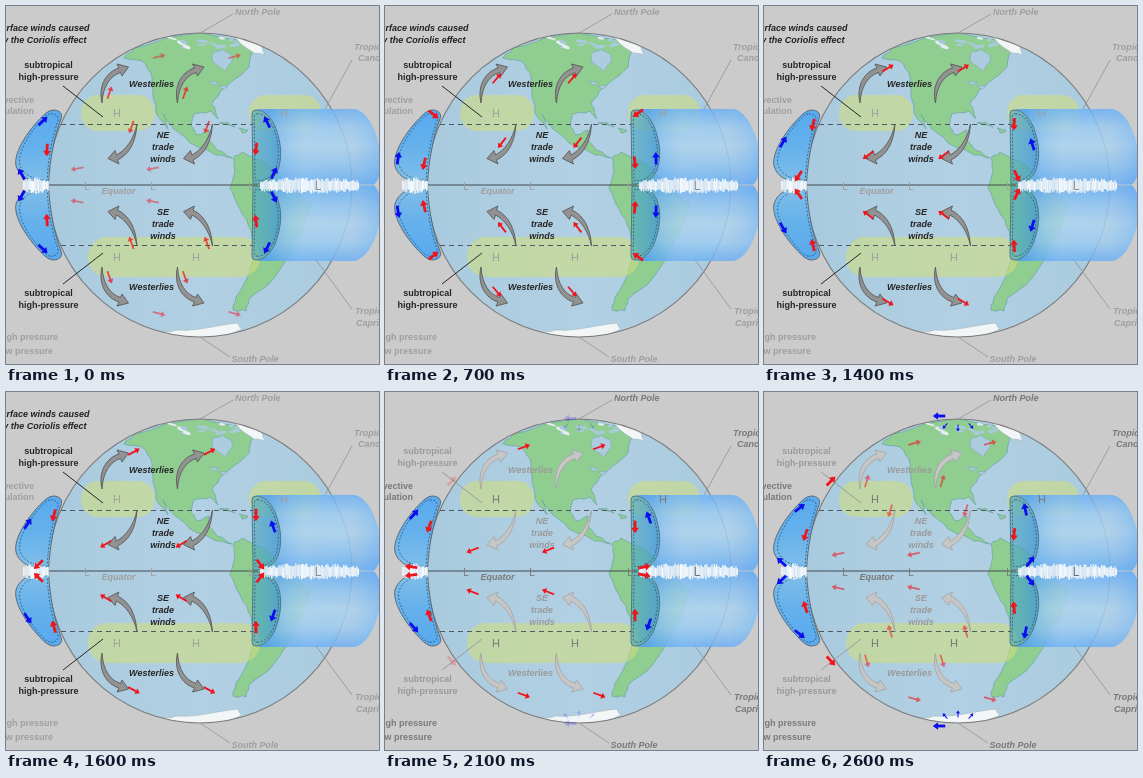
These frames come from a looping animation (373 px wide and 358 px high, 2.7 s). An HTML page with a canvas:

```html
<!DOCTYPE html>
<html lang="en">
<head>
<meta charset="utf-8">
<title>Global winds</title>
<style>
html, body { margin: 0; width: 100%; height: 100%; overflow: hidden; background: #cbcbcb; }
canvas { display: block; }
</style>
</head>
<body>
<canvas id="stage" width="373" height="358"></canvas>
<script>
const ctx = document.getElementById('stage').getContext('2d');
const W = 373, H = 358, LOOP = 2.7, SPACING = 75.5;
const RED = [240, 20, 28], BLUE = [12, 12, 240];
const clamp = v => Math.max(0, Math.min(1, v));
const ramp = (t, a, b) => clamp((t - a) / (b - a));
const mix = (a, b, k) => `rgb(${a.map((v, i) => Math.round(v + (b[i] - v) * k))})`;
const gray = (from, to, k) => mix([from, from, from], [to, to, to], k);
const red = mix(RED, BLUE, 0), blue = mix(RED, BLUE, 1);

function randomizer(seed) {
  return () => (seed = (seed * 16807) % 2147483647) / 2147483647;
}

// Surface wind tracks: one cubic Bezier each.
const westerly = [[101, 97], [106, 64], [134, 55], [163, 48]];
const trade = [[128, 111], [123, 142], [95, 162], [59, 164]];
// Convection cells: three cubic legs, each lasting one loop.
const cells = [
  [[41, 144], [40, 160], [34, 188], [15.5, 168], [5, 149], [27, 122], [37, 115], [62, 91], [43, 137]],
  [[250, 143], [248, 158], [253, 190], [268, 167], [277, 148], [263, 129], [261, 116], [246, 86], [251, 140]]
];

function bezier([a, b, c, d], u) {
  const v = 1 - u;
  const point = k => v ** 3 * a[k] + 3 * v * v * u * b[k] + 3 * v * u * u * c[k] + u ** 3 * d[k];
  const slope = k => v * v * (b[k] - a[k]) + 2 * v * u * (c[k] - b[k]) + u * u * (d[k] - c[k]);
  return { x: point(0), y: point(1), angle: Math.atan2(slope(1), slope(0)) };
}

function arrow({ x, y, angle }, color, length = 12.5, shaft = 2.8, head = 3.8) {
  const tip = length / 2, neck = tip - head * 1.4;
  ctx.save();
  ctx.translate(x, y);
  ctx.rotate(angle);
  ctx.fillStyle = color;
  ctx.fillRect(-tip, -shaft / 2, tip + neck + .5, shaft);
  ctx.beginPath();
  ctx.moveTo(neck, -head);
  ctx.lineTo(tip, 0);
  ctx.lineTo(neck, head);
  ctx.fill();
  ctx.restore();
}

function mirrored(draw) {
  draw();
  ctx.save();
  ctx.transform(1, 0, 0, -1, 0, H);
  draw();
  ctx.restore();
}

// Each surface wind appears twice per hemisphere.
function fourfold(draw) {
  mirrored(() => {
    draw();
    ctx.save();
    ctx.translate(SPACING, 0);
    draw();
    ctx.restore();
  });
}

function line(x1, y1, x2, y2, color, width = 1, dash = []) {
  ctx.strokeStyle = color;
  ctx.lineWidth = width;
  ctx.setLineDash(dash);
  ctx.beginPath();
  ctx.moveTo(x1, y1);
  ctx.lineTo(x2, y2);
  ctx.stroke();
  ctx.setLineDash([]);
}

function text(str, x, y, color, align = 'center', style = 'bold', size = 9) {
  ctx.font = `${style} ${size}px "Liberation Sans", Arial, sans-serif`;
  ctx.textAlign = align;
  ctx.fillStyle = color;
  ctx.fillText(str, x, y);
}

function shape(path, fill, stroke, width = 1) {
  ctx.fillStyle = fill;
  ctx.fill(path);
  ctx.strokeStyle = stroke;
  ctx.lineWidth = width;
  ctx.stroke(path);
}

function fade(x1, y1, x2, y2, ...stops) {
  const g = ctx.createLinearGradient(x1, y1, x2, y2);
  stops.forEach((c, i) => g.addColorStop(i / (stops.length - 1), c));
  return g;
}

// A coastline through a few points, roughened between them.
function coast(points) {
  const list = points.split(' ').map(p => p.split(',').map(Number));
  const rnd = randomizer(41), path = new Path2D();
  list.forEach(([x, y], i) => {
    const [nx, ny] = list[(i + 1) % list.length];
    path.lineTo(x, y);
    for (const k of [.33, .67])
      path.lineTo(x + (nx - x) * k + rnd() * 2 - 1, y + (ny - y) * k + rnd() * 2 - 1);
  });
  path.closePath();
  return path;
}

const globe = new Path2D();
globe.arc(194, 179, 152, 0, 7);

const lands = [
  '118,52 128,42 160,32 194,27 232,34 247,45 243,61 229,73 214,86 206,98 212,113 205,105 188,108 185,120 ' +
  '191,129 203,124 203,134 211,144 226,152 210,149 184,137 168,123 157,108 162,123 150,107 147,84 145,67 136,55',
  '227,152 236,146 260,157 282,180 305,198 294,228 281,253 262,279 243,293 240,305 227,304 230,291 ' +
  '243,268 248,250 246,230 241,214 231,198 224,182 229,165',
  '213,117 221,116 229,121', '233,122 242,124 236,127'
].map(coast);
const bays = ['207,47 216,43 225,48 226,56 219,65 207,56', '203,75 213,76 207,79', '213,80 222,79 216,83'].map(coast);
const ices = [
  '224,26 234,37 248,47 259,49 256,38',
  '154,327 170,324 200,322 232,317 236,323 210,336 170,336'
].map(coast);

const leftFace = new Path2D('M47 104C54 104 57 108 55 113C48 132 44 152 42.5 178C30 177 14 174 10 160C7 146 24 121 40 107Q44 104 47 104Z');
const rightFace = new Path2D('M250 104C258 104 264 110 269 120C276 138 276 152 272 164C268 173 260 178 252 178L247 178L246 108Q246 104 250 104Z');
const cylinder = new Path2D('M250 103L348 103C362 105 373 128 375 152C376 164 373 174 368 178.5L252 178.5C280 178 277 140 269 120C264 110 258 104 250 103Z');
const westBand = new Path2D('M96 97C92 80 100 66 113 62L111 58L122.5 61L116 70L114.5 66.5C104 70 97 80 96 97Z');
const tradeBand = new Path2D('M131 118C130 135 124 148 111.5 154L113 158L102 152.5L109 144.5L110.5 149C120 144 128 133 131 118Z');

function drawArcticWaters() {
  const rnd = randomizer(9);
  for (let i = 0; i < 16; i++) {
    ctx.fillStyle = i % 4 ? '#a9cadd' : '#e6eef0';
    ctx.beginPath();
    ctx.ellipse(166 + rnd() * 66, 30 + rnd() * 13, 2 + rnd() * 4, .7 + rnd() * 1.3, rnd() - .5, 0, 7);
    ctx.fill();
  }
}

function drawGlobe() {
  ctx.fillStyle = fade(42, 0, 346, 0, '#a9cade', '#b2d0e3', '#a9cade');
  ctx.fill(globe);
  ctx.save();
  ctx.clip(globe);
  lands.forEach(p => shape(p, '#90cd91', '#6fa9a8', .8));
  bays.forEach(p => shape(p, '#aeccdf', '#78aeb2', .6));
  drawArcticWaters();
  ices.forEach(p => shape(p, '#f3f6f7', '#9fb6c0', .6));
  ctx.restore();
  ctx.strokeStyle = '#7c7c7c';
  ctx.lineWidth = 1.1;
  ctx.stroke(globe);
  ctx.fillStyle = 'rgba(208,222,124,.58)';
  [[75, 89, 74, 36], [243, 89, 72, 36], [82, 231, 172, 40]].forEach(([x, y, w, h]) => {
    ctx.beginPath();
    ctx.roundRect(x, y, w, h, h * .48);
    ctx.fill();
  });
  mirrored(() => line(55, 118.5, 248, 118.5, '#4f5961', 1, [5, 4]));
  line(42, 179, 252, 179, '#454b50', 1.2);
}

function dashedInset(path, cx) {
  ctx.save();
  ctx.translate(cx, 142);
  ctx.scale(.84, .9);
  ctx.translate(-cx, -142);
  ctx.strokeStyle = '#24516f';
  ctx.lineWidth = .9;
  ctx.setLineDash([2, 2]);
  ctx.stroke(path);
  ctx.restore();
}

// Feathery cloud made of thin vertical streaks.
function drawCloud(x1, x2, seed) {
  const rnd = randomizer(seed);
  for (let x = x1; x < x2; x += 1.2) {
    const reach = 4 + 3 * Math.sin(Math.PI * (.1 + .85 * (x - x1) / (x2 - x1)));
    const color = mix([250, 252, 253], [198, 220, 238], rnd() * .75);
    line(x, 179.5 - reach * (.6 + .6 * rnd()), x, 179.5 + reach * (.6 + .6 * rnd()), color, 1.6);
  }
}

function drawCells() {
  mirrored(() => {
    ctx.globalAlpha = .8;
    ctx.fillStyle = fade(0, 103, 0, 179, '#5ea8f6', '#9ccbf1', '#b0d4ee', '#8cc1f0', '#5aa6f6');
    ctx.fill(cylinder);
    ctx.globalAlpha = 1;
    ctx.fillStyle = fade(262, 0, 373, 0, 'rgba(60,150,235,.4)', 'rgba(176,215,235,.2)', 'rgba(176,215,240,.1)', 'rgba(90,168,246,.4)');
    ctx.fill(cylinder);
    shape(rightFace, fade(246, 0, 275, 0, 'rgba(84,172,190,.66)', 'rgba(66,152,214,.8)'), '#4f6f80', .9);
    shape(leftFace, fade(0, 104, 0, 179, '#58a9ee', '#65b1ec', '#82bfe8'), '#59636a', .9);
    dashedInset(rightFace, 260);
    dashedInset(leftFace, 34);
  });
  drawCloud(255, 353, 77);
  drawCloud(18, 43, 19);
}

function drawLabels(dim) {
  const surface = gray(38, 154, dim), other = gray(159, 121, dim);
  const slanted = 'italic bold';
  ctx.globalAlpha = 1 - dim;
  text('Surface winds caused', 83.5, 25, '#222', 'right', slanted);
  text('by the Coriolis effect', 80.5, 37, '#222', 'right', slanted);
  ctx.globalAlpha = 1;
  mirrored(() => line(57, 80, 97, 111, surface));
  line(227, 8, 194, 27, '#999', .9);
  line(224, 351, 194, 331, '#999', .9);
  line(346, 54, 319, 103, '#999', .9);
  line(346, 303, 310, 254, '#999', .9);
  [62, 289.5].forEach(y => {
    text('subtropical', 42.5, y, surface);
    text('high-pressure', 42.5, y + 12, surface);
  });
  [80.5, 284].forEach(y => text('Westerlies', 145.5, y, surface, 'center', slanted));
  [['NE', 132], ['SE', 208.5]].forEach(([name, y]) =>
    [name, 'trade', 'winds'].forEach((word, i) => text(word, 157, y + i * 12, surface, 'center', slanted)));
  text('Equator', 112.5, 188, other, 'center', slanted);
  text('North Pole', 229, 9, other, 'left', slanted);
  text('South Pole', 225.5, 356, other, 'left', slanted);
  text('Tropic of', 348, 44, other, 'left', slanted);
  text('Cancer', 352, 55, other, 'left', slanted);
  text('Tropic of', 349, 308, other, 'left', slanted);
  text('Capricorn', 350, 320, other, 'left', slanted);
  text('Convective', 28, 97, other, 'right');
  text('circulation', 28, 108, other, 'right');
  text('High pressure', 52, 334, other, 'right');
  text('Low pressure', 47, 348, other, 'right');
  [[111, 111], [278, 111], [111, 255], [190, 255]].forEach(([x, y]) => text('H', x, y, other, 'center', 'normal', 11));
  [81, 147, 245].forEach(x => text('L', x, 184, other, 'center', 'normal', 10));
  text('L', 312, 184, gray(140, 110, dim), 'center', 'normal', 12);
}

function drawBands(dim) {
  fourfold(() => [westBand, tradeBand].forEach(p =>
    shape(p, gray(146, 198, dim), gray(91, 166, dim), .9)));
}

function drawSurfaceWinds(t) {
  [t - LOOP, t, t + LOOP].filter(u => u > -.4 && u < 3.1).forEach(u => {
    ctx.globalAlpha = Math.min(ramp(u, -.4, .15), 1 - ramp(u, 2.25, 3.1));
    [westerly, trade].forEach(track => {
      const pose = bezier(track, (u + .4) / 3.5);
      fourfold(() => arrow(pose, red, 13, 1.8, 3.1));
    });
  });
  ctx.globalAlpha = 1;
}

function drawCirculation(t) {
  cells.forEach(points => {
    for (let leg = 0; leg < 3; leg++) {
      const track = [0, 1, 2, 3].map(i => points[(leg * 3 + i) % points.length]);
      const age = t + leg * LOOP;
      const cold = ramp(age, 2.15, 2.5) - ramp(age, 5.5, 6);
      mirrored(() => arrow(bezier(track, t / LOOP), mix(RED, BLUE, cold)));
    }
  });
}

function drawPolarFlow(t) {
  const shown = ramp(t, 2, 2.5);
  ctx.globalAlpha = shown;
  mirrored(() => {
    arrow({ x: 187 - 20 * (t - 2), y: 27 - 5 * (t - 2), angle: Math.PI }, blue);
    arrow({ x: 67, y: 89, angle: -.8 }, red);
    for (let i = -1; i <= 1; i++)
      arrow({ x: 194 + 13 * i, y: 36 - 2 * i * i, angle: Math.PI / 2 - .72 * i }, blue, 7, 1, 2);
  });
  ctx.globalAlpha = 1;
}

function render(ms) {
  const t = Math.floor((ms % 2700) / 100) / 10;
  const dim = ramp(t, 1.9, 2.1);
  ctx.fillStyle = '#cbcbcb';
  ctx.fillRect(0, 0, W, H);
  drawGlobe();
  drawCells();
  drawBands(dim);
  drawLabels(dim);
  drawSurfaceWinds(t);
  drawCirculation(t);
  drawPolarFlow(t);
}

let start;
function tick(now) {
  start ??= now;
  render(now - start);
  requestAnimationFrame(tick);
}
render(0);
requestAnimationFrame(tick);
</script>
</body>
</html>
```
